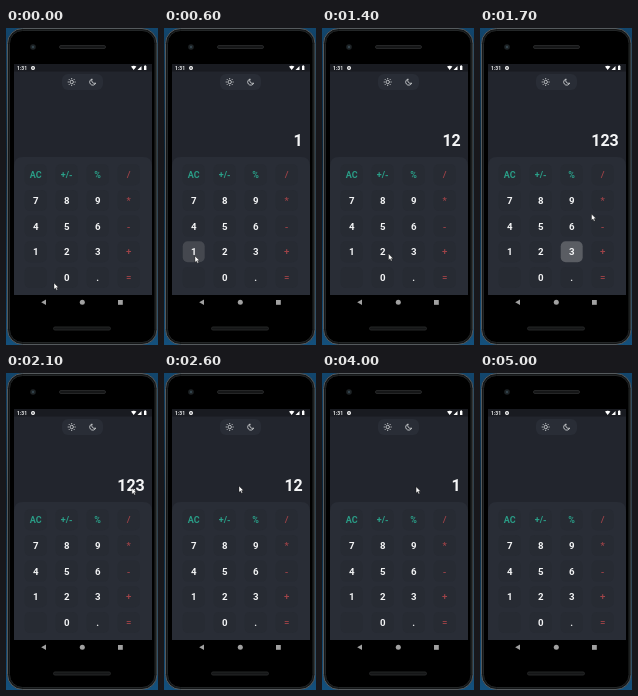
Write an HTML page that moves like this. It is 152 px wide and 317 px high and loops after 5900 ms.

```html
<!DOCTYPE html>
<html lang="en">
<head>
<meta charset="utf-8">
<title>Calculator</title>
<style>
  html, body { margin: 0; width: 100%; height: 100%; overflow: hidden; background: #0b1c2a; }
  svg { display: block; width: 152px; height: 317px; }
  text { font-family: Roboto, Arial, sans-serif; font-weight: 700; fill: #f4f5f6; }
  .key { font-size: 9.7px; text-anchor: middle; }
  .fn { font-size: 9px; fill: #2a9f88; }
  .op { font-weight: 500; fill: #a04348; }
</style>
</head>
<body>
<svg viewBox="0 0 152 317" xmlns="http://www.w3.org/2000/svg">
  <defs>
    <linearGradient id="desk" x2="0" y2="1">
      <stop offset="0" stop-color="#12466d"/>
      <stop offset=".4" stop-color="#0b2437"/>
      <stop offset="1" stop-color="#14507c"/>
    </linearGradient>
  </defs>
  <rect width="152" height="317" fill="url(#desk)"/>

  <!-- phone body -->
  <rect x="1.5" y=".5" width="149.5" height="316" rx="15" fill="#141617" stroke="#555a5d"/>
  <rect x="3.5" y="2.5" width="145.5" height="312" rx="13" fill="#000" stroke="#232627"/>
  <rect x="53.5" y="17.5" width="46" height="3" rx="1.5" fill="#151617" stroke="#252627"/>
  <rect x="47.5" y="299" width="57" height="3" rx="1.5" fill="#151617" stroke="#252627"/>
  <circle cx="27" cy="19" r="2.8" fill="#1d2225"/>
  <circle cx="27" cy="19" r="1.2" fill="#34444c"/>

  <!-- screen -->
  <rect x="8" y="36" width="138" height="231" fill="#22252d"/>
  <rect x="8" y="36" width="138" height="7.5" fill="#191b21"/>
  <path d="M8 267V138q0-9 9-9H137q9 0 9 9V267z" fill="#292d36"/>

  <!-- status bar -->
  <text x="11" y="41.8" font-size="5">1:31</text>
  <circle cx="27" cy="40" r="1.4" fill="none" stroke="#fff" stroke-width="1.2"/>
  <path d="M125 38.6q2.7-1.8 5.4 0l-2.7 3.4zM131.5 42l4-4v4zM138 38h.6v-.7h1.2v.7h.6v4h-2.4z" fill="#fff"/>

  <!-- theme switch -->
  <rect x="56" y="46" width="41" height="16" rx="6" fill="#292d36"/>
  <g fill="none" stroke="#dfe1e3" stroke-width=".8">
    <circle cx="65.7" cy="54" r="1.7"/>
    <g id="rays"></g>
    <path d="M86.2 51a3.1 3.1 0 1 0 3.5 4.1a2.8 2.8 0 0 1-3.5-4.1z"/>
  </g>

  <!-- navigation -->
  <g fill="#a1a1a1">
    <path d="M40 271.5v5.6l-4.8-2.8z"/>
    <circle cx="76.3" cy="274.3" r="2.5"/>
    <rect x="112" y="272" width="4.8" height="4.8"/>
  </g>

  <g id="keys"></g>
  <text id="out" x="138.8" y="118" font-size="16" text-anchor="end"></text>
  <path id="cursor" d="M0 0V6.3L1.5 5L2.5 7.2L3.6 6.7L2.6 4.6H4.5z" fill="#fff" stroke="#111" stroke-width=".4"/>
</svg>
<script>
const NS = 'http://www.w3.org/2000/svg';
const LOOP = 5900, STEP = 100, HIDE = 5000;
const byId = id => document.getElementById(id);

function add(parent, tag, attrs, content = '') {
  const el = document.createElementNS(NS, tag);
  for (const name in attrs) el.setAttribute(name, attrs[name]);
  el.textContent = content;
  parent.append(el);
  return el;
}

for (let a = 0; a < 360; a += 45) {
  add(byId('rays'), 'path', { d: 'M65.7 51.2v-1.2', transform: `rotate(${a} 65.7 54)` });
}

const rows = [['AC', '+/-', '%', '/'], ['7', '8', '9', '*'], ['4', '5', '6', '-'],
  ['1', '2', '3', '+'], ['', '0', '.', '=']];
const pads = {};
rows.forEach((row, r) => row.forEach((label, c) => {
  const x = 29.7 + c * 31, y = 146.7 + r * 25.7;
  const kind = c === 3 ? 'op' : r === 0 ? 'fn' : '';
  const box = { x: x - 11, y: y - 10.5, width: 22, height: 21, rx: 5 };
  add(byId('keys'), 'rect', { ...box, fill: '#272b33' });
  pads[label] = add(byId('keys'), 'rect', { ...box, fill: '#fff', opacity: 0 });
  add(byId('keys'), 'text', { x, y: y + 3.5, class: 'key ' + kind }, label);
}));

// each tap types a digit, each leftward swipe removes one
const taps = [600, 1200, 1600];
const swipes = [75, 83, 75].map((x, i) => ({ x, end: 2500 + i * 800 }));

// pointer stops: time, x, y
const stops = [
  [0, 48, 255], [400, 31, 228], [700, 31, 228], [1000, 63, 226],
  [1300, 63, 226], [1600, 95, 224], [1700, 111.5, 186],
  ...swipes.flatMap(({ x, end }) => [[end - 500, 128, 115], [end, x, 113], [end + 100, x, 113]]),
  [4800, 59, 145], [4900, 4, 198], [LOOP, 4, 198]
];

function pointerAt(t) {
  const i = stops.findIndex(s => s[0] > t);
  const [t0, x0, y0] = stops[i - 1], [t1, x1, y1] = stops[i];
  const k = ((t - t0) / (t1 - t0)) ** 2;
  return [x0 + (x1 - x0) * k, y0 + (y1 - y0) * k];
}

function draw(now) {
  const t = Math.floor((now % LOOP) / STEP) * STEP;
  const [x, y] = pointerAt(t);
  byId('cursor').setAttribute('transform', `translate(${x} ${y})`);
  byId('cursor').setAttribute('visibility', t < HIDE ? 'visible' : 'hidden');

  const typed = taps.filter(at => at <= t).length;
  const removed = swipes.filter(s => s.end + 100 <= t).length;
  byId('out').textContent = '123'.slice(0, typed - removed);

  taps.forEach((at, i) => {
    const age = t - at;
    pads[i + 1].setAttribute('opacity', age >= 0 && age < 200 ? 0.14 + age / 1000 : 0);
  });
}

const begin = performance.now();
function tick() {
  draw(performance.now() - begin);
  requestAnimationFrame(tick);
}
tick();
</script>
</body>
</html>
```
